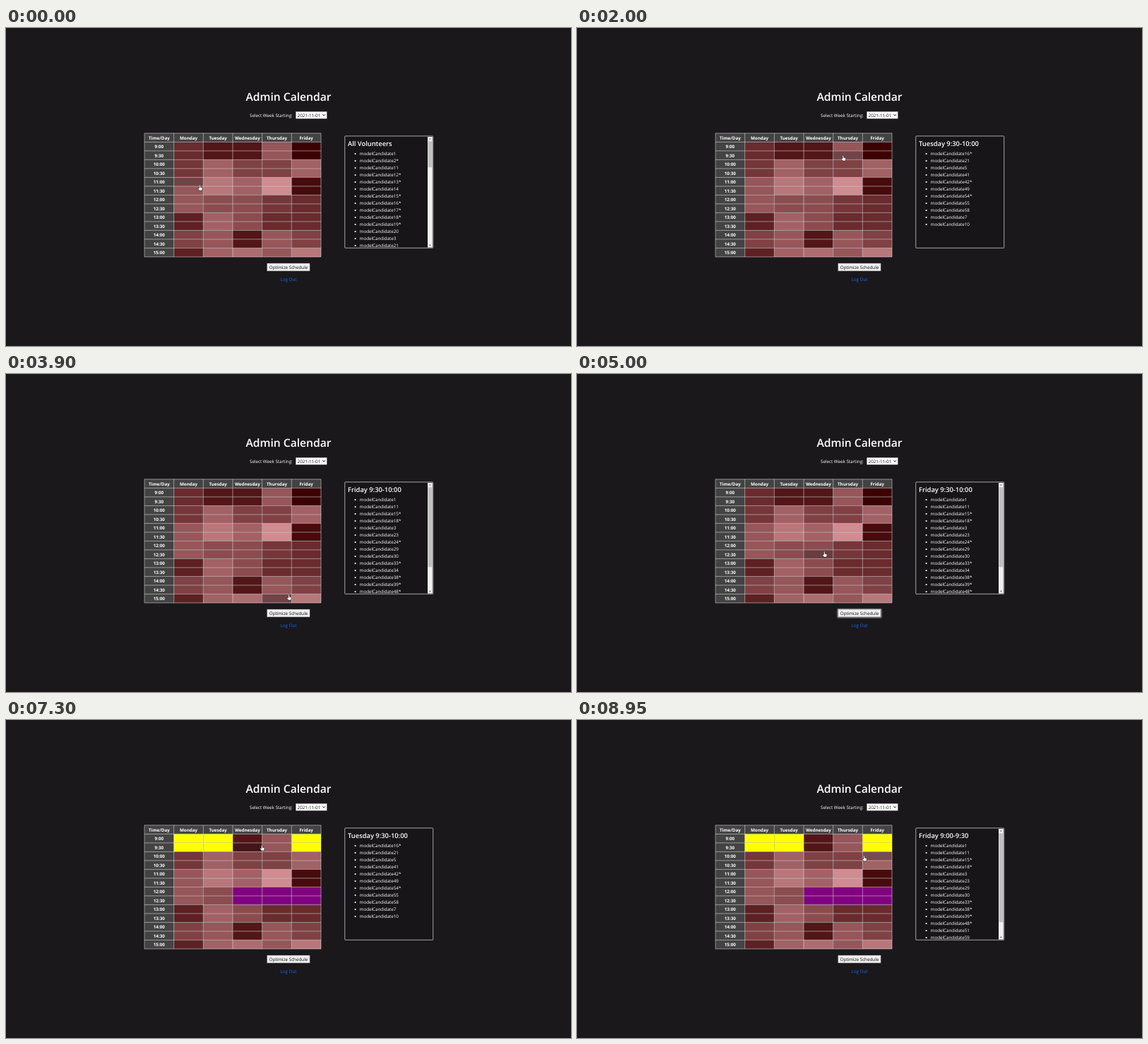
Recreate the animation shown at these times as an HTML page. Size 800 by 450 pixels, loop 9000 ms.

```html
<!DOCTYPE html>
<html lang="en">
<head>
<meta charset="utf-8">
<title>Admin Calendar</title>
<style>
  html, body { margin: 0; width: 100%; height: 100%; overflow: hidden; background: #1a181b; }
  svg { display: block; width: 100%; height: 100%; }
  text { font: 500 6.25px "Open Sans", "Noto Sans", sans-serif; fill: #fff; text-rendering: geometricPrecision; }
  .title { font-size: 15.65px; font-weight: 600; }
  .head { font-size: 9.35px; font-weight: 600; }
  .bold { font-weight: 700; }
  .mid { text-anchor: middle; }
  .dark { fill: #111; }
  .link { fill: #0d6efd; }
</style>
</head>
<body>
<svg id="stage" viewBox="0 0 800 450" xmlns="http://www.w3.org/2000/svg">
  <defs>
    <clipPath id="clip"><rect x="480.5" y="154" width="123.5" height="156.8"/></clipPath>
    <filter id="glow" x="-5%" y="-5%" width="110%" height="110%"><feGaussianBlur stdDeviation="0.7"/></filter>
  </defs>
</svg>
<script>
const LOOP = 9000, STEP = 50;
const X0 = 196, Y0 = 148.9, CW = 250 / 6, RH = 12.5;
const PREFIX = 'modelCandidate';
const days = ['Monday', 'Tuesday', 'Wednesday', 'Thursday', 'Friday'];

// Shade levels, one digit (base 14) per weekday
const shades = ['42280', '42280', '59669', '59669', '8b9d1', '8b9d1', '87754',
  '87754', '39744', '39744', '68286', '68286', '39a8b'];

const lists = {
  all: { head: 'All Volunteers', thumb: 37, ids: '1 2* 11 12* 13* 14 15* 16* 17* 18* 19* 20 3 21' },
  tue: { head: 'Tuesday 9:30-10:00', thumb: 0, ids: '16* 21 5 41 42* 49 54* 55 58 7 10' },
  fri: { head: 'Friday 9:30-10:00', thumb: 113, ids: '1 11 15* 18* 3 23 24* 29 30 33* 34 38* 39* 48*' },
  early: { head: 'Friday 9:00-9:30', thumb: 126, ids: '1 11 15* 18* 3 23 29 30 33* 38* 39* 48* 51 59' }
};
const shown = [[0, 'all'], [1400, 'tue'], [2900, 'fri'], [6600, 'tue'], [8450, 'early']];

// Pointer tip: time, x, y
const path = [
  [0, 274.3, 222], [250, 283, 205], [600, 300, 181], [700, 300, 181], [900, 303, 178],
  [1050, 303, 178], [1150, 301.6, 177.2], [1700, 301.6, 177.2], [1900, 354, 180], [2150, 411, 180],
  [3250, 411, 180], [3400, 411, 183.5], [3700, 405, 262], [4000, 398, 337],
  [4750, 398, 337], [5000, 350.2, 251], [5200, 326, 203], [5450, 312.6, 180.3],
  [7100, 312.6, 180.3], [7300, 362.2, 177], [7500, 399, 171], [7700, 416, 168.5],
  [8800, 416, 168.5], [8950, 406.6, 191.8]
];

const stage = document.getElementById('stage');
function add(parent, tag, attrs, text) {
  const el = document.createElementNS('http://www.w3.org/2000/svg', tag);
  for (const k in attrs) el.setAttribute(k, attrs[k]);
  if (text !== undefined) el.textContent = text;
  parent.appendChild(el);
  return el;
}
const rect = (p, x, y, width, height, fill, more) => add(p, 'rect', { x, y, width, height, fill, ...more });
const label = (p, x, y, str, cls = '') => add(p, 'text', { x, y, class: cls }, str);
const show = (el, on) => el.setAttribute('visibility', on ? 'inherit' : 'hidden');

function shade(level) {
  return `rgb(${Math.round(60 + 11.3 * level)},${Math.round(10.8 * level)},${Math.round(2 + 11 * level)})`;
}

// Page heading and week picker
label(stage, 400, 102.6, 'Admin Calendar', 'title mid');
label(stage, 345, 125.7, 'Select Week Starting:');
rect(stage, 410.3, 118.2, 44, 10, '#fff', { stroke: '#767676', 'stroke-width': 0.4 });
label(stage, 412.6, 125.6, '2021-11-01', 'dark');
add(stage, 'path', { d: 'M448.4 122.2l1.8 1.9 1.8-1.9', fill: 'none', stroke: '#111', 'stroke-width': 1 });

// Calendar table
rect(stage, X0, Y0, 250, RH * 14, '#434344');
const cells = shades.map((row, r) => [...row].map((digit, c) => {
  const x = X0 + CW * (c + 1), y = Y0 + RH * (r + 1);
  rect(stage, x, y, CW, RH, '#1a181b');
  return { el: rect(stage, x, y, CW, RH), base: shade(parseInt(digit, 14)) };
}));
let grid = '';
for (let i = 0; i <= 6; i++) grid += `M${X0 + CW * i} ${Y0}v${RH * 14}`;
for (let i = 0; i <= 14; i++) grid += `M${X0} ${Y0 + RH * i}h250`;
add(stage, 'path', { d: grid, stroke: '#eee', 'stroke-width': 0.5, fill: 'none' });
['Time/Day', ...days].forEach((d, i) => label(stage, X0 + CW * (i + 0.5), Y0 + 8.7, d, 'bold mid'));
shades.forEach((_, r) => {
  const time = 9 + (r >> 1) + (r % 2 ? ':30' : ':00');
  label(stage, X0 + CW / 2, Y0 + RH * (r + 1) + 8.7, time, 'bold mid');
});

// Button and link
const ring = rect(stage, 368.8, 332.3, 62.4, 12.6, '#111', { rx: 1.2, stroke: '#ccc', 'stroke-width': 0.7 });
const button = rect(stage, 369.7, 333, 60.4, 10.9, '#efefef', { stroke: '#767676', 'stroke-width': 0.4 });
label(stage, 400, 340.9, 'Optimize Schedule', 'dark mid');
label(stage, 400, 358.4, 'Log Out', 'link mid');

// Volunteer panel
const frame = { x: 479.8, y: 153, width: 124.8, height: 158.2, rx: 1 };
add(stage, 'rect', { ...frame, fill: 'none', stroke: '#808080', 'stroke-width': 1.1, filter: 'url(#glow)' });
add(stage, 'rect', { ...frame, fill: '#171518', stroke: '#b5b5b5', 'stroke-width': 0.7 });
const panel = add(stage, 'g', { 'clip-path': 'url(#clip)' });
for (const key in lists) {
  const list = lists[key], g = list.el = add(panel, 'g', {});
  label(g, 484, 167.2, list.head, 'head');
  list.ids.split(' ').forEach((id, i) => {
    const y = 180.1 + 10 * i;
    add(g, 'circle', { cx: 494.6, cy: y - 2.1, r: 1.1, fill: '#fff' });
    label(g, 500.6, y, PREFIX + id);
  });
  if (!list.thumb) continue;
  rect(g, 597, 153.5, 6.8, 157.3, '#f1f1f1');
  rect(g, 597.5, 160.2, 5.9, list.thumb, '#c1c1c1');
  add(g, 'path', { d: 'M599 157.6l1.4-1.6 1.4 1.6zM599 306.8l1.4 1.6 1.4-1.6z', fill: '#505050' });
}

const hand = add(stage, 'path', {
  d: 'M-.8 .6Q0-.6 .8 .6V3.2L3 3.7Q4 4 3.8 5L3.2 8H-.6L-2.4 5.2Q-2.6 4.2-1.6 4.4L-.8 5Z',
  fill: '#fff', stroke: '#111', 'stroke-width': 0.5
});

function pointerAt(t) {
  const i = path.findIndex(p => p[0] > t);
  if (i < 0) return path[path.length - 1].slice(1);
  const [t0, x0, y0] = path[i - 1], [t1, x1, y1] = path[i];
  const k = (t - t0) / (t1 - t0);
  return [x0 + (x1 - x0) * k, y0 + (y1 - y0) * k];
}

function cellColor(r, c, base, optimized) {
  if (optimized && r < 2 && [0, 1, 4].includes(c)) return '#ffff00';
  if (optimized && (r === 6 || r === 7) && c > 1) return '#800080';
  return base;
}

function draw(t) {
  const [x, y] = pointerAt(t);
  const overCol = Math.floor((x - X0) / CW) - 1, overRow = Math.floor((y - Y0) / RH) - 1;
  cells.forEach((row, r) => row.forEach(({ el, base }, c) => {
    el.setAttribute('fill', cellColor(r, c, base, t >= 6150));
    el.setAttribute('opacity', r === overRow && c === overCol ? 0.7 : 1);
  }));
  const current = shown.filter(s => s[0] <= t).pop()[1];
  for (const key in lists) show(lists[key].el, key === current);
  show(ring, t >= 4200 && t < 6600);
  button.setAttribute('fill', y > 333 ? '#e5e5e5' : '#efefef');
  hand.setAttribute('transform', `translate(${x} ${y})`);
}

const start = performance.now();
function tick() {
  const t = (performance.now() - start) % LOOP;
  draw(Math.floor(t / STEP) * STEP);
  requestAnimationFrame(tick);
}
draw(0);
requestAnimationFrame(tick);
</script>
</body>
</html>
```
